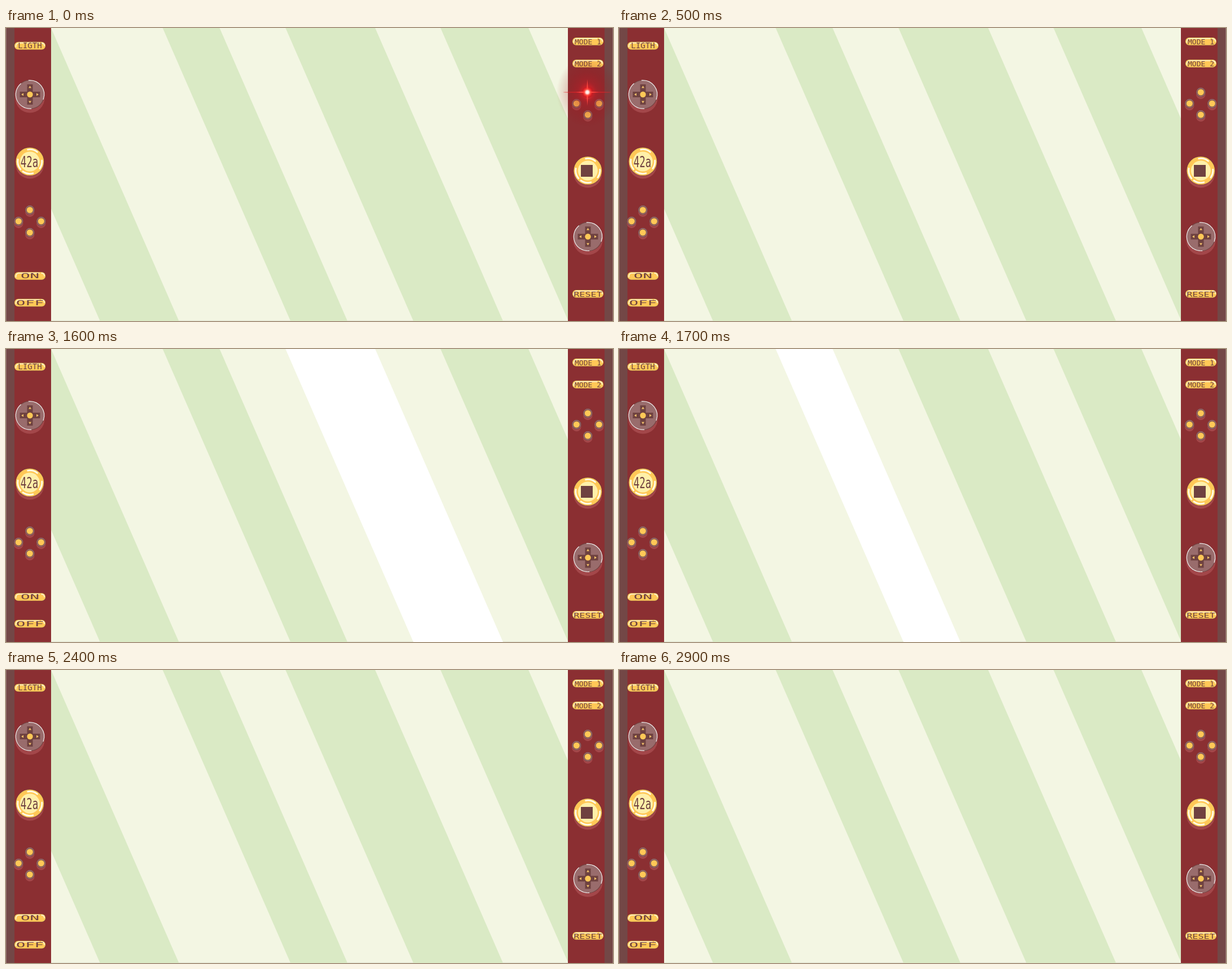
These frames come from a looping animation (1077x520 px, 3400 ms). An HTML page:

```html
<!DOCTYPE html>
<html lang="en">
<head>
<meta charset="utf-8">
<title>Console</title>
<style>
  html, body { margin: 0; width: 100%; height: 100%; overflow: hidden; background: #f3f6e3; }
  svg { display: block; width: 100%; height: 100%; }
  text { font-family: "DejaVu Sans Mono", monospace; fill: #6f4240; text-anchor: middle; }
</style>
</head>
<body>
<svg id="stage" viewBox="0 0 1077 520" preserveAspectRatio="none">
  <defs>
    <radialGradient id="glow">
      <stop offset="0" stop-color="#ff2a2a" stop-opacity=".95"/>
      <stop offset=".12" stop-color="#f02025" stop-opacity=".75"/>
      <stop offset=".3" stop-color="#c01520" stop-opacity=".42"/>
      <stop offset=".6" stop-color="#a01018" stop-opacity=".22"/>
      <stop offset="1" stop-color="#900c14" stop-opacity="0"/>
    </radialGradient>
    <radialGradient id="core">
      <stop offset="0" stop-color="#fff"/>
      <stop offset=".3" stop-color="#ffe0d8"/>
      <stop offset=".6" stop-color="#ff5548" stop-opacity=".8"/>
      <stop offset="1" stop-color="#ff2020" stop-opacity="0"/>
    </radialGradient>
  </defs>
</svg>
<script>
const NS = "http://www.w3.org/2000/svg";
const LOOP = 3400, FLARE_END = 500, SWEEP = 1500, STEP = 100;
const stage = document.getElementById("stage");
const GOLD = "#ffc857", DARK = "#6f4240", SHADOW = "#a3474a", MAUVE = "#996c6c";

function add(tag, attrs, parent = stage) {
  const el = document.createElementNS(NS, tag);
  for (const k in attrs) el.setAttribute(k, attrs[k]);
  parent.appendChild(el);
  return el;
}
const rect = (x, y, width, height, fill, rx = 0, parent) =>
  add("rect", { x, y, width, height, fill, rx }, parent);
const disc = (cx, cy, r, fill, parent) => add("circle", { cx, cy, r, fill }, parent);
const line = (d, stroke, w, parent) =>
  add("path", { d, stroke, "stroke-width": w, fill: "none", "stroke-linecap": "round" }, parent);

function arc(cx, cy, r, from, to, color, w, parent) {
  const at = deg => {
    const a = deg * Math.PI / 180;
    return `${cx + r * Math.cos(a)} ${cy + r * Math.sin(a)}`;
  };
  const big = to - from > 180 ? 1 : 0;
  line(`M${at(from)}A${r} ${r} 0 ${big} 1 ${at(to)}`, color, w, parent);
}

function label(x, y, str, size, sx) {
  add("text", { transform: `translate(${x} ${y}) scale(${sx} 1)`, "font-size": size }).textContent = str;
}

function pill(cx, cy, str, size, sx, base) {
  const x = cx - 27.5, y = cy - 6.7;
  rect(x - .5, y - .5, 56, 14.4, DARK, 7);
  rect(x, y, 55, 13.4, GOLD, 6.5);
  line(`M${x + 2.5} ${cy + 2}Q${x + 2} ${y + 2} ${x + 8} ${y + 1.7}H${x + 44}`, "#fff6d8", 1.6);
  line(`M${x + 48} ${y + 1.8}Q${x + 53} ${y + 2} ${x + 53} ${cy}`, "#fff6d8", 1.6);
  label(cx, base, str, size, sx);
}

function pad(cx, cy) {
  disc(cx, cy + 6.5, 26, SHADOW);
  disc(cx, cy, 26, DARK);
  disc(cx, cy, 25, MAUVE);
  arc(cx, cy, 25.2, -95, 20, "#f4ecec", 1.2);
  arc(cx, cy, 25.2, 85, 230, "#f4ecec", 1.2);
  rect(cx - 18, cy - 5, 36, 10, DARK);
  rect(cx - 5, cy - 18, 10, 36, DARK);
  for (let a = 0; a < 360; a += 90)
    add("path", { d: "M0-15.5L2.5-11.5H-2.5Z", fill: "#f0bf6a", transform: `translate(${cx} ${cy}) rotate(${a})` });
  disc(cx, cy, 5.2, GOLD);
}

function coin(cx, cy) {
  disc(cx, cy + 5.5, 25, SHADOW);
  disc(cx, cy, 25.5, DARK);
  disc(cx, cy, 24.8, GOLD);
  disc(cx, cy, 17.5, "#fff0a9");
  arc(cx, cy, 21.5, -100, -52, "#fffbe8", 2.8);
  arc(cx, cy, 21.5, -5, 35, "#fffbe8", 2.8);
  arc(cx, cy, 21.5, 75, 125, "#fffbe8", 2.8);
  arc(cx, cy, 21.5, 140, 190, "#fffbe8", 2.8);
}

function knob(cx, cy) {
  disc(cx, cy + 4, 8.3, SHADOW);
  disc(cx, cy, 8.6, DARK);
  disc(cx, cy, 7.9, MAUVE);
  disc(cx, cy, 6.3, DARK);
  disc(cx, cy, 5.6, GOLD);
}
function knobs(cx, cy) {
  for (const [dx, dy] of [[0, -20], [-20, 0], [20, 0], [0, 20]]) knob(cx + dx, cy + dy);
}

// screen, stripes listed right to left in sweep order
rect(0, 0, 1077, 520, "#f3f6e3");
rect(80, 519, 917, 1, "#e2e5d4");
const stripes = [[771, 927], [496, 655], [278, 379], [-60, 80]].map(([a, b]) =>
  add("path", { d: `M${a} 0H${b}L${b + 226.8} 520H${a + 226.8}Z` }));

// side panels
rect(0, 0, 80, 520, "#8b2f32");
rect(0, 0, 15, 520, "#734746");
rect(997, 0, 80, 520, "#8b2f32");
rect(1062, 0, 15, 520, "#734746");
rect(0, 0, 1, 520, "#94706f");
rect(1076, 0, 1, 520, "#94706f");

pill(42.5, 31.5, "LIGTH", 13.5, 1.05, 36.3);
pad(42.5, 118);
coin(42.3, 237);
label(41.5, 247, "42a", 27, .65);
knobs(42.3, 343);
pill(42.5, 440, "ON", 11.5, 2.4, 444.3);
pill(42.5, 487.5, "OFF", 11.5, 2.35, 491.8);

pill(1032.5, 23.8, "MODE 1", 13, 1, 28.5);
pill(1032.5, 63, "MODE 2", 13, 1, 67.8);
knobs(1032.3, 134);
coin(1032.3, 253);
rect(1020, 243, 21, 21, DARK);
pad(1032.5, 370.3);
pill(1032.5, 471.8, "RESET", 13, 1.29, 476.5);

// red flare over the top right knob
const flare = add("g", {});
rect(1022, 104, 20, 20, "#8b2026", 8, flare);
add("ellipse", { cx: 1031.5, cy: 114, rx: 55, ry: 62, fill: "url(#glow)" }, flare);
add("ellipse", { cx: 1031.5, cy: 114, rx: 43, ry: 1, fill: "#e5262b", opacity: .6 }, flare);
add("path", { d: "M1031.5 91L1033 112.5L1052 114L1033 115.5L1031.5 138L1030 115.5L1011 114L1030 112.5Z", fill: "#ff4a42" }, flare);
disc(1031.5, 114, 9, "url(#core)", flare);

function render(t) {
  flare.setAttribute("display", t < FLARE_END ? "inline" : "none");
  const lit = Math.floor((t - SWEEP) / STEP);
  stripes.forEach((s, i) => s.setAttribute("fill", i === lit ? "#fff" : "#daeac5"));
}

const start = performance.now();
function tick() {
  render((performance.now() - start) % LOOP);
  requestAnimationFrame(tick);
}
tick();
</script>
</body>
</html>
```
